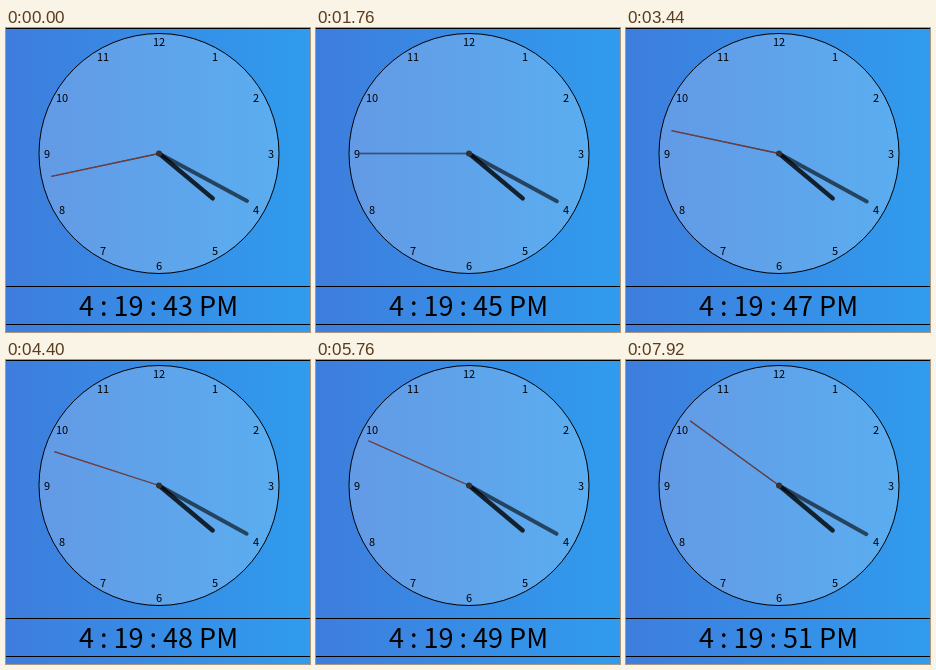
Write an HTML page with a canvas that moves like this. It is 304 px wide and 304 px high and loops after 8 s.

```html
<!DOCTYPE html>
<html>
<head>
<meta charset="utf-8">
<style>
html, body { margin: 0; height: 100%; overflow: hidden; }
canvas { display: block; }
</style>
</head>
<body>
<canvas id="stage" width="304" height="304"></canvas>
<script>
const ctx = document.getElementById('stage').getContext('2d');
const CX = 153, CY = 125.5, LOOP = 8000, FIRST_TICK = 400;
const START = (16 * 60 + 19) * 60 + 43;
const FONT = '"Noto Sans CJK SC", "Noto Sans CJK JP", "Noto Sans", sans-serif';

const sky = ctx.createLinearGradient(0, 0, 304, 0);
sky.addColorStop(0, '#3e7ddd');
sky.addColorStop(1, '#309cee');

function disc(r, fill, stroke) {
  ctx.beginPath();
  ctx.arc(CX, CY, r, 0, 2 * Math.PI);
  ctx.fillStyle = fill;
  ctx.fill();
  if (stroke) {
    ctx.strokeStyle = stroke;
    ctx.lineWidth = 1;
    ctx.stroke();
  }
}

// turn: fraction of a full revolution, clockwise from 12
function hand(turn, length, width, color, cap) {
  const a = turn * 2 * Math.PI;
  ctx.beginPath();
  ctx.moveTo(CX, CY);
  ctx.lineTo(CX + length * Math.sin(a), CY - length * Math.cos(a));
  ctx.lineWidth = width;
  ctx.lineCap = cap;
  ctx.strokeStyle = color;
  ctx.stroke();
}

function label(text, x, baseline, size) {
  ctx.font = `${size}px ${FONT}`;
  ctx.textAlign = 'center';
  ctx.fillStyle = '#000';
  ctx.fillText(text, x, baseline);
}

function draw(time) {
  const s = START + Math.floor((time % LOOP - FIRST_TICK) / 1000) + 1;
  const hour = Math.floor(s / 3600), minute = Math.floor(s / 60) % 60;
  const pad = n => String(n).padStart(2, '0');

  ctx.fillStyle = sky;
  ctx.fillRect(0, 0, 304, 304);
  ctx.fillStyle = '#000';
  for (const y of [0, 258, 296]) ctx.fillRect(0, y, 304, 1);

  disc(120, 'rgba(255,255,255,.2)', '#000');
  for (let n = 1; n <= 12; n++) {
    const a = n * Math.PI / 6;
    label(n, CX + 112 * Math.sin(a), CY + 4.5 - 112 * Math.cos(a), 11);
  }

  hand(s / 43200, 70, 4.5, 'rgba(0,0,0,.8)', 'round');
  hand(s / 3600, 100, 4, 'rgba(0,0,0,.6)', 'round');
  hand(s / 60, 110, 1.3, 'rgba(0,0,0,.7)', 'butt');
  hand(s / 60, 110, .8, 'rgba(255,70,20,.6)', 'butt');
  disc(3, '#333');

  label(`${hour % 12 || 12} : ${pad(minute)} : ${pad(s % 60)} ${hour < 12 ? 'AM' : 'PM'}`, 152.5, 288, 27);
}

function loop() {
  draw(performance.now());
  requestAnimationFrame(loop);
}
loop();
</script>
</body>
</html>
```
